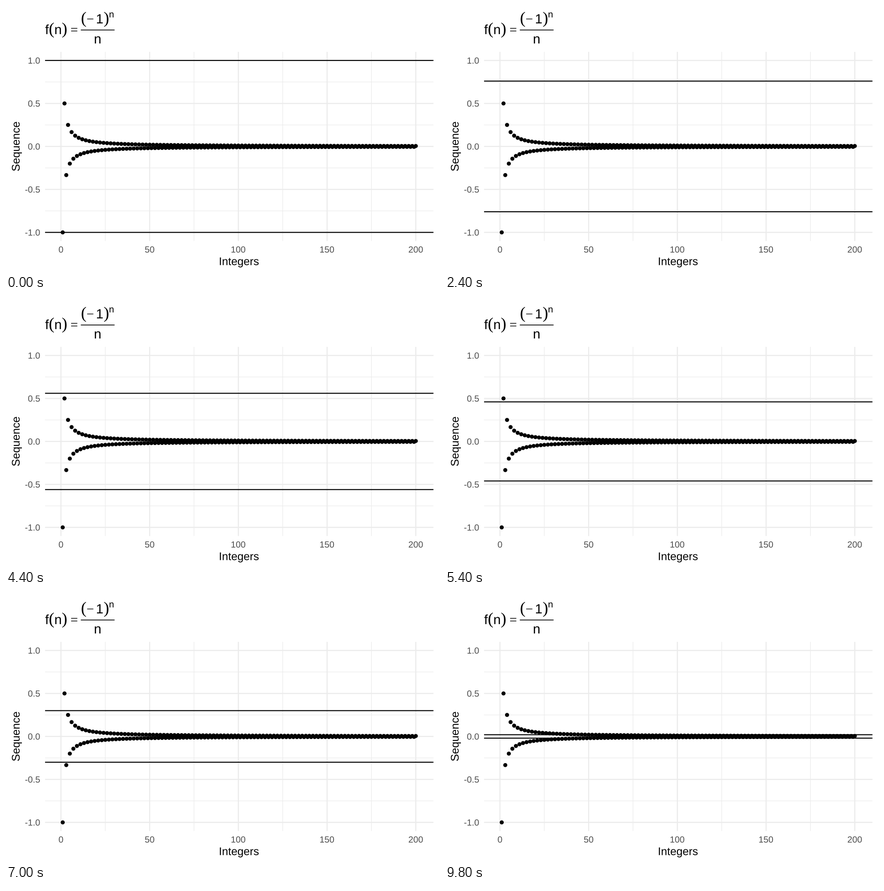
Write a matplotlib script that moves like this. It is 952x588 px and loops after 10 s.

```python
import matplotlib.pyplot as plt
from matplotlib.animation import FuncAnimation
from matplotlib.collections import PatchCollection
from matplotlib.patches import Circle, PathPatch
from matplotlib.textpath import TextPath
from matplotlib.transforms import Affine2D

W, H, DPI = 952, 588, 64
PT = 72 / DPI                      # points per pixel
LEFT, RIGHT, TOP, BOTTOM = 85.9, 939.8, 101.0, 517.5
SANS, SERIF = "Liberation Sans", "Liberation Serif"
GRID, TICK, INK = "#ebebeb", "#4d4d4d", "black"
AXIS_SIZE, TICK_SIZE, TITLE_SIZE = 24.44, 19.56, 29.33
FRAMES, INTERVAL = 50, 200
STEP = 0.02

fig = plt.figure(figsize=(W / DPI, H / DPI), dpi=DPI, facecolor="white")
ax = fig.add_axes([0, 0, 1, 1])
ax.set_xlim(0, W)
ax.set_ylim(H, 0)
ax.axis("off")


def px(n):
    """Horizontal pixel of integer n (axis runs from 1 to 200 plus 5 %)."""
    return LEFT + (n + 8.95) / 218.9 * (RIGHT - LEFT)


def py(v):
    """Vertical pixel of value v (axis runs from -1 to 1 plus 5 %)."""
    return (TOP + BOTTOM) / 2 - v / 2.2 * (BOTTOM - TOP)


def line(xs, ys, color, width, z):
    return ax.plot(xs, ys, color=color, lw=width * PT, zorder=z,
                   solid_capstyle="butt", snap=False)[0]


def label(s, x, y, size, color=INK, align="left", family=SANS, angle=0):
    """Draw s with its baseline through (x, y)."""
    path = TextPath((0, 0), s, size=size, prop={"family": family})
    box = path.get_extents()
    shift = {"left": 0, "center": (box.x0 + box.x1) / 2, "right": box.x1}[align]
    place = (Affine2D().translate(-shift, 0).scale(1, -1)
             .rotate_deg(-angle).translate(x, y))
    ax.add_patch(PathPatch(place.transform_path(path), facecolor=color,
                           lw=0, zorder=5, snap=False))


def draw_grid():
    for i in range(8):
        n = 25 * i
        line([px(n)] * 2, [TOP, BOTTOM], GRID, 2.37 if i % 2 == 0 else 1.19, 1)
    line([px(200)] * 2, [TOP, BOTTOM], GRID, 2.37, 1)
    for i in range(-4, 5):
        line([LEFT, RIGHT], [py(i / 4)] * 2, GRID,
             2.37 if i % 2 == 0 else 1.19, 1)


def draw_axes():
    for n in range(0, 201, 50):
        label(str(n), px(n), 543, TICK_SIZE, TICK, "center")
    for i in range(-2, 3):
        label(f"{i / 2:.1f}", 74.4, py(i / 2) + 7, TICK_SIZE, TICK, "right")
    label("Integers", (LEFT + RIGHT) / 2, 570.6, AXIS_SIZE, align="center")
    label("Sequence", 29.9, (TOP + BOTTOM) / 2, AXIS_SIZE, align="center",
          angle=90)


def draw_title():
    paren = 1.25 * TITLE_SIZE
    base, num, den = 61.9, 38.3, 82.5
    label("f", 86, base, TITLE_SIZE)
    label("(", 94.1, base, paren, family=SERIF)
    label("n", 106.3, base, TITLE_SIZE)
    label(")", 122.6, base, paren, family=SERIF)
    label("=", 141.7, base, TITLE_SIZE, family=SERIF)
    label("(", 164.8, num, paren, family=SERIF)
    label("\u2212", 177, num, TITLE_SIZE, family=SERIF)
    label("1", 197.8, num, TITLE_SIZE)
    label(")", 214.6, num, paren, family=SERIF)
    label("n", 226.3, 25.2, 0.7 * TITLE_SIZE)
    line([164.5, 238.7], [52.8, 52.8], INK, 1.7, 5)
    label("n", 201.5, den, TITLE_SIZE, align="center")


def draw_points():
    dots = [Circle((px(n), py((-1) ** n / n)), 4.45) for n in range(1, 201)]
    ax.add_collection(PatchCollection(dots, facecolor=INK, edgecolor="none",
                                      zorder=3, snap=False))


draw_grid()
draw_axes()
draw_title()
draw_points()
upper = line([LEFT, RIGHT], [py(1)] * 2, INK, 2.2, 4)
lower = line([LEFT, RIGHT], [py(-1)] * 2, INK, 2.2, 4)


def update(i):
    eps = 1 - STEP * i
    upper.set_ydata([py(eps)] * 2)
    lower.set_ydata([py(-eps)] * 2)
    return upper, lower


anim = FuncAnimation(fig, update, frames=FRAMES, interval=INTERVAL,
                     repeat=True, repeat_delay=0, blit=False)
plt.show()
```
